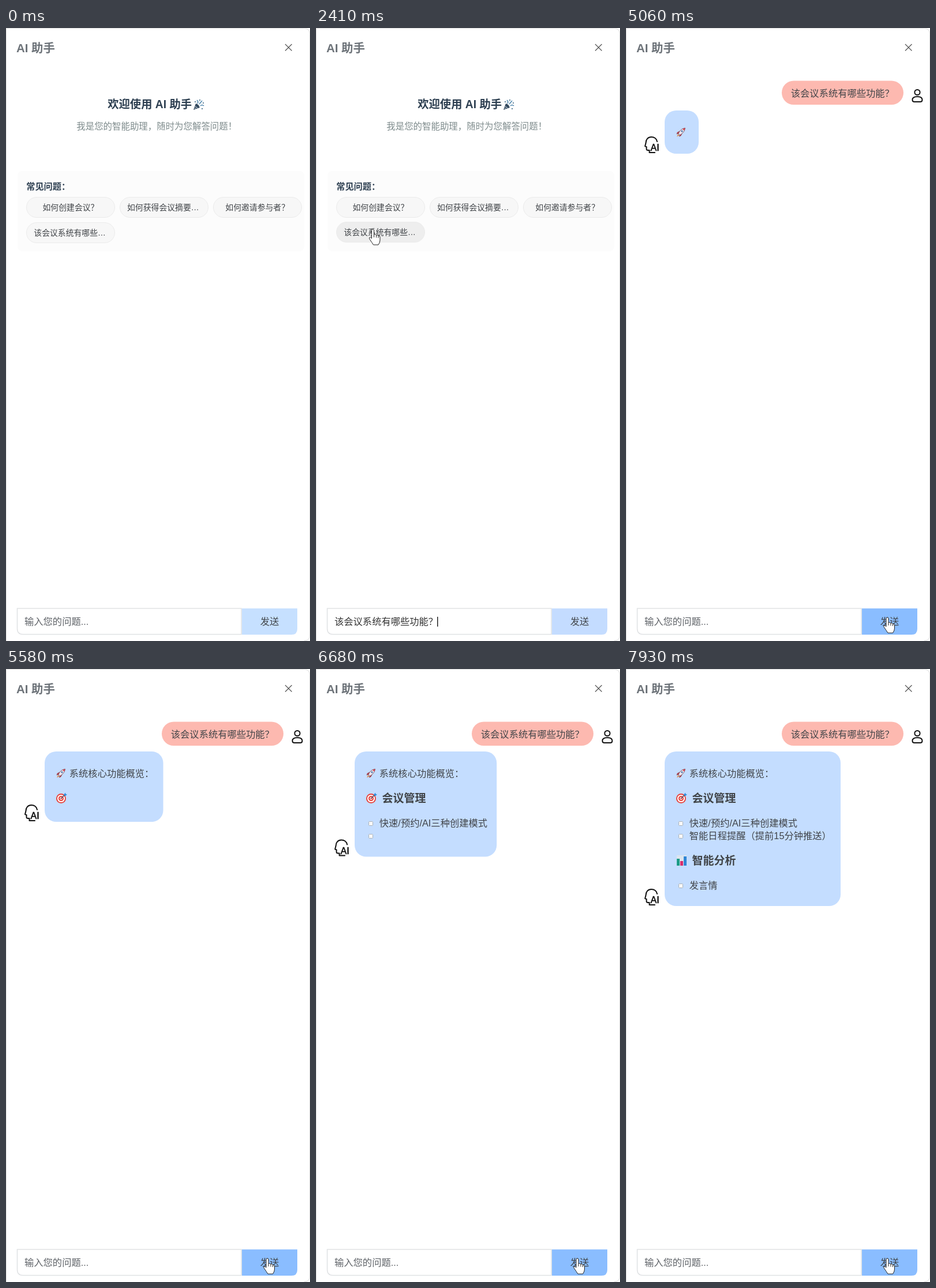
Animation, 527 px wide and 1063 px high, one loop 8000 ms. Source, as an HTML page:

```html
<!DOCTYPE html>
<html lang="zh-CN">
<head>
<meta charset="utf-8">
<style>
  html, body { margin: 0; width: 100%; height: 100%; overflow: hidden; background: #fff; }
  svg { display: block; width: 100%; height: 100%; }
  text { font: 16.3px "Liberation Sans", "Noto Sans CJK SC", "Noto Sans CJK", sans-serif; fill: #404448; }
  .bold { font-weight: 700; }
  .small { font-size: 13.85px; }
  .head { font-size: 19px; font-weight: 700; }
  .line { fill: none; stroke: #111; stroke-width: 2; stroke-linejoin: round; stroke-linecap: round; }
  .pointer { fill: #fff; stroke: #222; stroke-linejoin: round; }
</style>
</head>
<body>
<svg viewBox="0 0 527 1063">
  <defs>
    <g id="party">
      <path d="M1 19L5 8Q10 9 12 15Z" fill="#34495e"/>
      <path d="M4 13L8 16M3 16L5 17.5" stroke="#b9c6d2" stroke-width="1.2"/>
      <path d="M8 8Q10 5 7 2M11 9L16 3M13 12Q16 9 19 12" fill="none" stroke="#4d86ad" stroke-width="1.5"/>
      <path d="M3 4h2v2H3zM11 1h2v2h-2zM17 6h2v2h-2zM15 16h2v2h-2z" fill="#5f7f96"/>
    </g>
    <g id="rocket">
      <path d="M6 6L2 8 1 11 4 10ZM10 10L8 14 5 15 6.5 12Z" fill="#cf3a45" stroke="#70394a" stroke-width=".6"/>
      <path d="M3.5 11L1 15.5 5.5 13Z" fill="#d9863f"/>
      <path d="M15.5 .5C10 1 6 5 4 10L6.5 12.5C11 10 15 6 15.5 .5Z" fill="#ece9f0" stroke="#70394a" stroke-width=".8"/>
      <path d="M15.5 .5L11 2 14 5Z" fill="#cf3a45"/>
      <circle cx="10" cy="6" r="1.7" fill="#5a82b5"/>
    </g>
    <g id="target">
      <circle cx="8.5" cy="10.5" r="8.5" fill="#e8403a"/>
      <circle cx="8.5" cy="10.5" r="6.6" fill="#fff"/>
      <circle cx="8.5" cy="10.5" r="4.5" fill="#e8403a"/>
      <circle cx="8.5" cy="10.5" r="2.4" fill="#fff"/>
      <circle cx="8.5" cy="10.5" r="1.300" fill="#e8403a"/>
      <path d="M8.5 10.5L15 4" stroke="#41566e" stroke-width="1.4"/>
      <path d="M13 4L16 .5 16.5 3 19 3.5 15.5 6.5Z" fill="#2f8fdc"/>
    </g>
    <g id="chart">
      <path d="M1 1H18V19H1Z" fill="#dce5ee"/>
      <path d="M1 7H6V19H1Z" fill="#1c9c86"/>
      <path d="M7 11H12V19H7Z" fill="#d72f6d"/>
      <path d="M13 3H18V19H13Z" fill="#2f86d6"/>
    </g>
    <g id="dot"><rect x="4.5" y="5.5" width="7" height="7" rx="1" fill="#f8f8f8" stroke="#aab2ba"/></g>
  </defs>

  <path d="M.5 1063V.5H516.5Q526.5 .5 526.5 10.5V1053Q526.5 1062.5 517 1062.5" fill="none" stroke="#dedede"/>
  <text x="18" y="41.8" class="bold" style="font-size:20.4px;fill:#6d7379">AI 助手</text>
  <path d="M484 28L495.5 39.5M495.5 28L484 39.5" stroke="#555" stroke-width="1.2"/>

  <g id="welcome">
    <text x="176.300" y="139.300" class="bold" style="font-size:19.3px;fill:#2c3e50">欢迎使用 AI 助手</text>
    <use href="#party" x="324" y="123"/>
    <text x="122.300" y="175.800" style="font-size:15.45px;fill:#7f8c8d">我是您的智能助理，随时为您解答问题！</text>
    <rect x="20" y="248" width="497" height="139" rx="8" fill="#fcfcfc"/>
    <text x="35.200" y="279.600" class="bold" style="font-size:15.2px;fill:#2c3e50">常见问题：</text>
  </g>

  <g id="chat">
    <rect x="270" y="91.500" width="211" height="41.500" rx="20.700" fill="#fdb9b0"/>
    <text x="285.800" y="119">该会议系统有哪些功能？</text>
    <g class="line">
      <circle cx="505" cy="111.500" r="4.600"/>
      <path d="M496.500 124.500C496.500 120.500 500 119 505 119S513.500 120.500 513.500 124.500Q513.500 128 510 128H500Q496.500 128 496.500 124.500Z"/>
    </g>
    <rect id="bubble" x="67" y="143" rx="20" fill="#c4ddff"/>
    <g id="bot">
      <path class="line" d="M22 9.500C21 4.500 17 1.500 12 1.500C6 1.500 2.500 6 2.500 11.500L1 17.500 3.500 18.500V22Q3.500 24.500 6 24.500H8.500V28.500H18"/>
      <text x="10.500" y="25.500" style="font-size:16px;fill:#111;stroke:#111;stroke-width:.6">AI</text>
    </g>
  </g>

  <path d="M408 1006.500H19.500V1041.500Q19.500 1051.500 29.500 1051.500H408Z" fill="#fff" stroke="#e0e2e4" stroke-width="1.5"/>
  <path id="send" d="M409 1006.500H505V1042Q505 1052 495 1052H409Z"/>
  <text x="440.700" y="1035.300">发送</text>
  <text id="entry" x="32" y="1034.800"></text>
  <rect id="caret" x="210" y="1021" width="1.500" height="17" fill="#222"/>

  <path id="arrow" class="pointer" d="M0 0V20.500L5 16 8.500 23.500 11.500 22 8 15H15Z"/>
  <g id="hand" class="pointer">
    <path d="M-1.500 2Q-1.500 0 .5 0T2.500 2V9Q5 8 6.500 10Q8.500 9 10 11Q13 10.500 13 14V19Q13 23 10 27H1.500Q-1 23 -5.500 16.500Q-6 13.500 -3.500 14L-1.500 16Z"/>
    <path d="M2.500 9V14M6.500 10V14.500M10 11V15" fill="none"/>
  </g>
</svg>
<script>
const LOOP = 8000, TOKEN = 65;
const $ = id => document.getElementById(id);
const show = (el, on) => el.setAttribute('visibility', on ? 'visible' : 'hidden');
const move = (el, x, y) => el.setAttribute('transform', `translate(${x} ${y})`);
const ramp = (t, a, b) => Math.min(1, Math.max(0, (t - a) / (b - a)));
const mix = (a, b, k) => `rgb(${a.map((v, i) => Math.round(v + (b[i] - v) * k))})`;

function add(parent, tag, attrs, text = '') {
  const el = document.createElementNS('http://www.w3.org/2000/svg', tag);
  for (const key in attrs) el.setAttribute(key, attrs[key]);
  el.textContent = text;
  return parent.appendChild(el);
}

function addPill(x, y, textX, label) {
  const g = add($('welcome'), 'g', {});
  const box = add(g, 'rect', { x: x + .5, y: y + .5, width: 153, height: 35, rx: 17.5, fill: '#f7f7f7', stroke: '#ebebeb' });
  add(g, 'text', { x: textX, y: y + 23.2, class: 'small' }, label);
  return { g, box };
}
addPill(35, 293, 63.5, '如何创建会议？');
addPill(197, 293, 210, '如何获得会议摘要…');
addPill(359, 293, 380.3, '如何邀请参与者？');
const pill = addPill(35, 337, 48.3, '该会议系统有哪些…');

// Reply: start time, icon, vertical centre, bubble bottom, streamed tokens
const lines = [
  [5055, 'rocket', 181, 218, '|系统|核心|功能|概览：'],
  [5580, 'target', 224, 265, '|会|议|管理'],
  [5990, 'dot', 267, 303.5, '|快速|/预约|/|AI|三种|创建|模式'],
  [6630, 'dot', 289, 325.5, '|智能|日|程|提醒|（提前|15|分钟|推送）'],
  [7350, 'chart', 332, 373, '|智|能|分|析'],
  [7799, 'dot', 375, 411, '|发言|情'],
].map(([start, icon, y, bottom, text]) => {
  const head = icon === 'target' || icon === 'chart';
  const x = head ? 114.5 : 109.8;
  const g = add($('chat'), 'g', {});
  add(g, 'use', { href: '#' + icon, x: 87, y: y - (head ? 10 : 8) });
  const label = add(g, 'text', { x, y: y + (head ? 7 : 6.2), class: head ? 'head' : '' });
  return { start, x, bottom, g, label, tokens: text.split('|') };
});

// Pointer path: time, x, y
const path = [
  [650, 262, 578], [1190, 262, 578], [1590, 93, 334], [1660, 93, 334], [2010, 98, 341],
  [2219, 98, 341], [2220, 88, 333], [2409, 88, 333], [2410, 98, 349], [3380, 98, 349],
  [3580, 397, 740], [3660, 397, 740], [3915, 445, 960], [3960, 445, 962], [4330, 452.5, 1022], [LOOP, 452.5, 1022],
];

function pointerAt(t) {
  const i = Math.max(1, path.findIndex(p => p[0] > t));
  const [t0, x0, y0] = path[i - 1], [t1, x1, y1] = path[i];
  const k = ramp(t, t0, t1), e = k * k * (3 - 2 * k);
  return [x0 + (x1 - x0) * e, y0 + (y1 - y0) * e];
}

function drawReply(t) {
  let right = 105.8, bottom = 218;
  for (const line of lines) {
    const on = t >= line.start;
    show(line.g, on);
    if (!on) continue;
    const count = Math.floor((t - line.start) / TOKEN) + 1;
    line.label.textContent = line.tokens.slice(0, count).join('');
    right = Math.max(right, line.x + line.label.getComputedTextLength());
    bottom = line.bottom;
  }
  $('bubble').setAttribute('width', right + 16.2 - 67);
  $('bubble').setAttribute('height', bottom - 143);
  move($('bot'), 32, bottom - 30.5);
}

function draw(t) {
  const sent = t >= 5055, filled = t >= 2410 && !sent;
  show($('welcome'), !sent);
  show($('chat'), sent);
  drawReply(t);

  const hover = ramp(t, 1460, 1590) - ramp(t, 3480, 3760);
  move(pill.g, 0, -hover);
  pill.box.setAttribute('fill', mix([247, 247, 247], [238, 238, 238], hover));

  $('send').setAttribute('fill', t < 4270
    ? mix([198, 224, 255], [196, 220, 255], ramp(t, 650, 790))
    : mix([196, 220, 255], [138, 189, 255], ramp(t, 4270, 4800)));
  $('entry').textContent = filled ? '该会议系统有哪些功能？' : '输入您的问题...';
  $('entry').style.fill = filled ? '#333' : '#5f6368';
  show($('caret'), t >= 2410 && t < 4540 && (t - 2410) % 1030 < 530);

  const [x, y] = pointerAt(t);
  const hand = (t >= 2220 && t < 3440) || y > 1006;
  show($('hand'), hand);
  show($('arrow'), t >= 650 && !hand);
  move($('hand'), x, y);
  move($('arrow'), x + .5, y + .5);
}

function tick() {
  draw(performance.now() % LOOP);
  requestAnimationFrame(tick);
}
tick();
</script>
</body>
</html>
```
